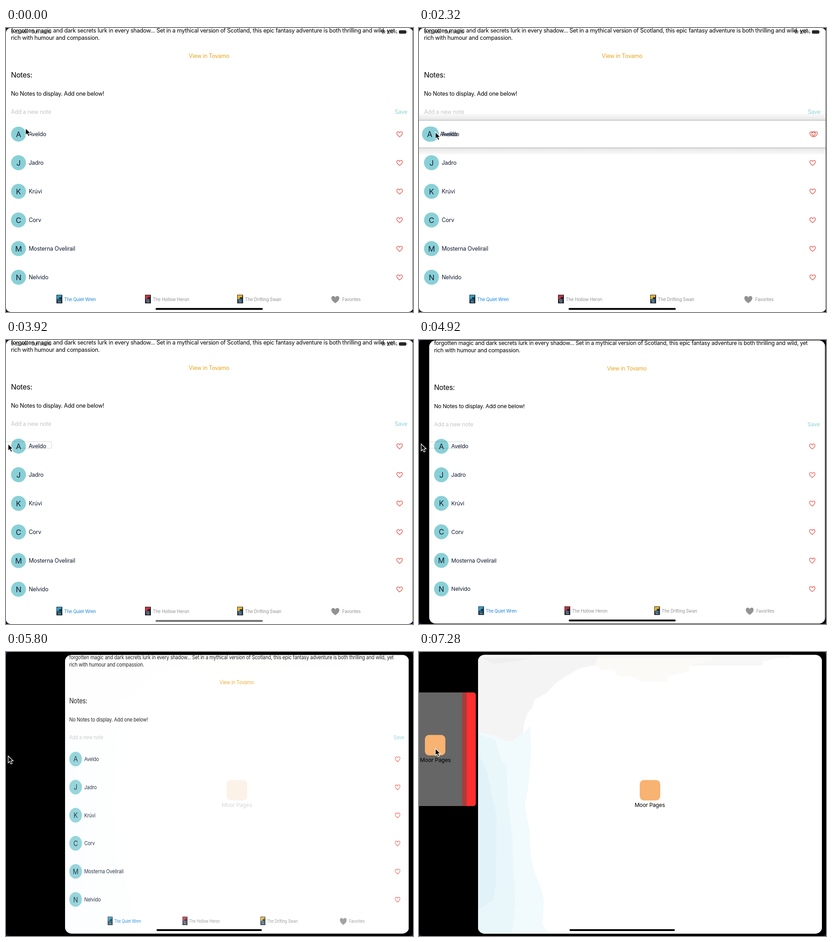
Recreate the animation shown at these times as an HTML page. Size 896 by 625 pixels, loop 8 s.

```html
<!DOCTYPE html>
<html lang="en">
<head>
<meta charset="utf-8">
<title>Dragging a row into a new window</title>
<style>
  html, body { margin: 0; width: 100%; height: 100%; overflow: hidden; background: #1c1236; }
  svg { display: block; width: 896px; height: 625px; }
  text { font: 12.4px Inter, "Open Sans", sans-serif; letter-spacing: -.017em; white-space: pre; }
</style>
</head>
<body>
<svg viewBox="0 0 896 625">
  <defs>
    <clipPath id="windowClip"><rect id="clipRect"/></clipPath>
    <linearGradient id="shade" x1="0" y1="1" x2="0" y2="0">
      <stop offset="0" stop-opacity=".24"/>
      <stop offset=".22" stop-opacity=".09"/>
      <stop offset=".5" stop-opacity=".06"/>
      <stop offset="1" stop-opacity=".025"/>
    </linearGradient>
  </defs>
  <rect width="896" height="625" rx="9"/>
  <g clip-path="url(#windowClip)">
    <rect width="896" height="625" fill="#fff"/>
    <g id="app"></g>
    <g id="splash"></g>
  </g>
  <rect id="home" height="4" rx="2"/>
  <g id="preview"></g>
  <g id="panel"></g>
  <path id="cursor" d="M0 0V15.4L3.5 12.1 6 17.8 8.9 16.5 6.4 11H11.2Z" stroke="#fff" stroke-width="1.2"/>
</svg>
<script>
const $ = id => document.getElementById(id);
const set = (id, attrs) => { for (const k in attrs) $(id).setAttribute(k, attrs[k]); };
const clamp = v => Math.max(0, Math.min(1, v));
const lerp = (a, b, p) => a + (b - a) * p;
const ramp = (t, from, to) => clamp((t - from) / (to - from));
const spring = (ms, rate) => {
  const x = Math.max(0, ms) / 1000 * rate;
  return 1 - (1 + x) * Math.exp(-x);
};

const LOOP = 8000, STEP = 40, ROW_Y = 233.5, ROW_GAP = 63;
const INK = '#101a30', RED = '#e4463c', TEAL = '#89d0d6', ORANGE = '#f8b271';

const label = (x, y, str, fill = '#000', size = 12.4, anchor = 'start', weight = 400) =>
  `<text x="${x}" y="${y}" fill="${fill}" text-anchor="${anchor}" style="font-size:${size}px;font-weight:${weight}">${str}</text>`;
const box = (x, y, w, h, fill, extra = '') =>
  `<rect x="${x}" y="${y}" width="${w}" height="${h}" fill="${fill}" ${extra}/>`;
const shape = (d, fill, extra = '') => `<path d="${d}" fill="${fill}" ${extra}/>`;
const heart = (x, y, k, paint) =>
  `<path transform="translate(${x} ${y}) scale(${k})" d="M0 5.7C-3 3.6-6.2 1-6.2-2-6.2-6.2-1.6-6.6 0-3.2 1.6-6.6 6.2-6.2 6.2-2 6.2 1 3 3.6 0 5.7Z" ${paint}/>`;

const row = (name, y) =>
  `<circle cx="27.5" cy="${y}" r="16.5" fill="${TEAL}"/>` +
  label(27.5, y + 6, name[0], INK, 16.5, 'middle') +
  label(50, y + 4.5, name, INK) +
  heart(866.5, y + .3, 1, `fill="none" stroke="${RED}" stroke-width="1.2"`);

const cover = (x, base, main, accent) =>
  box(x, 587, 13, 19, base) +
  shape(`M${x + 1} 588h11l-2 5-3-1-2 4-4 1Z`, main) +
  shape(`M${x + 2} 598l4-2 5 2-2 3H${x + 2}Z`, accent) +
  box(x + 3, 602, 7, 1.5, '#e8e8e8', 'opacity=".7"');

const tab = (x, name, color) => label(x, 600.6, name, color, 9.8);

const statusBar =
  `<g id="status" opacity=".85">` +
  label(11, 12, '9:52 AM', '#000', 9.3, 'start', 500) +
  label(56, 12, 'Sun Jul 10', '#000', 9.3, 'start', 500) +
  label(862, 12, '100%', '#000', 9.3, 'end', 500) +
  [440, 447, 454].map(x => `<circle cx="${x}" cy="9" r="1.3" fill="#777"/>`).join('') +
  `<path d="M825 7.5q5-4 10 0M827 9.5q3-2.4 6 0" fill="none" stroke="#000" stroke-width="1.4"/><circle cx="830" cy="11.6" r="1.2"/>` +
  box(865, 5, 16, 7.5, '#000', 'rx="2"') + box(881.8, 7.2, 1.2, 3, '#555') + `</g>`;

const people = ['Aveldo', 'Jadro', 'Krúvi', 'Corv', 'Mosterna Ovelirail', 'Nelvido'];

$('app').innerHTML =
  label(11, 10, 'forgotten magic and dark secrets lurk in every shadow... Set in a mythical version of Scotland, this epic fantasy adventure is both thrilling and wild, yet') +
  label(11, 26.3, 'rich with humour and compassion.') +
  statusBar +
  label(447, 66, 'View in Tovamo', '#e9a31c', 12.4, 'middle') +
  label(11, 109, 'Notes:', '#000', 15.8) +
  label(11, 149.2, 'No Notes to display. Add one below!') +
  label(11, 189.2, 'Add a new note', '#c5c5c7') +
  label(883.5, 189.2, 'Save', '#8fd2d7', 12.4, 'end') +
  people.map((name, i) => row(name, ROW_Y + i * ROW_GAP)).join('') +
  cover(111, '#17303f', '#3a9cc0', '#26627f') + tab(128, 'The Quiet Wren', '#1a86dc') +
  cover(306, '#20202a', '#c8323c', '#4d6f86') + tab(323, 'The Hollow Heron', '#929295') +
  cover(509, '#262d36', '#ecb720', '#3b78a8') + tab(526, 'The Drifting Swan', '#929295') +
  heart(725, 597.6, 1.42, 'fill="#929292"') + tab(740, 'Favorites', '#929295') +
  box(895, 0, 1, 625, '#555');

const appIcon = (x, y, size) => box(x, y, size, size, ORANGE, 'rx="9"');

$('splash').innerHTML =
  box(130, 6, 758, 615, '#fff') +
  shape('M250 6H820L815 13H790L757 21V30H595L560 30H250Z', '#f7f7f7') +
  shape('M388 13H645V18L595 30V42L550 53 545 65H492L470 55 437 52 430 38 400 40 388 25Z', '#fcfaf7') +
  shape('M130 6H395L388 28 355 36 325 52 302 68 281 90 254 105 250 122 238 136 231 160 228 192 195 198 165 184 130 178Z', '#f4f4f4') +
  shape('M140 13H250L225 18 165 26Z', '#eeeeee') +
  shape('M130 175L165 185 200 199 230 180 245 162 247 220 240 300 233 340 243 390 246 450 256 490 266 512 275 545 272 600 285 621H130Z', '#f1fafc') +
  shape('M130 180L168 194 182 240 193 250 195 330 205 400 208 480 212 560 204 621H130Z', '#eaf7fa') +
  shape('M130 225L150 260 160 312 171 360 170 505 165 545 130 568Z', '#e1f3f9') +
  appIcon(486, 281.7, 45) + label(508, 341, 'Moor Pages', '#000', 12.1, 'middle');

$('preview').innerHTML =
  `<g id="lifted">` + row(people[0], ROW_Y) + `</g>` +
  `<g id="shadow">` + box(-10, 189.5, 916, 15, 'url(#shade)') +
  `<rect x="-10" y="-277.5" width="916" height="15" fill="url(#shade)" transform="scale(1 -1)"/></g>` +
  box(0, 204.5, 896, 58, 'none', 'id="outline" rx="14" stroke="#000" stroke-width="9"');

$('panel').innerHTML =
  `<g id="panelBack">` + ['panelRed', 'panelGray', 'panelBand'].map((id, i) =>
    `<rect id="${id}" fill="${['#ff302f', '#666', '#a83c3c'][i]}"/>`).join('') + `</g>` +
  `<g id="panelIcon">` + appIcon(13, 182.5, 45) + `</g>` +
  `<g id="panelLabel">` + label(36, 242, 'Moor Pages', '#000', 12.3, 'middle') + `</g>`;

const cursorPath = [
  [0, 43, 220.5], [1160, 43, 220.5], [1760, 39, 226], [2040, 39, 226], [2320, 36, 229], [2840, 32, 229],
  [3200, 12, 229], [3680, 6, 229], [3880, 6, 229], [3920, 4.7, 228.7], [6480, 4.7, 228.7]
];

function cursorAt(t) {
  if (t >= 6520) return [36, 212.3];
  const i = Math.max(1, cursorPath.findIndex(k => k[0] >= t));
  const [a, b] = [cursorPath[i - 1], cursorPath[i]];
  const p = ramp(t, a[0], b[0]);
  return [lerp(a[1], b[1], p), lerp(a[2], b[2], p)];
}

function drawWindow(t) {
  const s = spring(t - 4880, 18.7);
  const x = 130 * s, y = 6.5 * s;
  const w = lerp(896, 887, s) - x, h = lerp(625, 619.7, s) - y;
  set('clipRect', { x, y, width: w, height: h, rx: s > 0 ? 14 : 10 });
  set('app', { transform: `translate(${x} ${y}) scale(${w / 896} ${h / 625})` });
  set('status', { display: t < 4920 ? 'inline' : 'none' });
  set('splash', { opacity: ramp(t, 5720, 6240) });

  const gray = Math.round(110 * (ramp(t, 2840, 3120) - ramp(t, 4320, 4480)));
  const half = lerp(118, 116, s);
  set('home', { x: 447.3 - half, y: lerp(616.3, 610, s), width: 2 * half, fill: `rgb(${gray},${gray},${gray})` });
}

function drawPreview(t, cursorX) {
  const lift = ramp(t, 440, 640), s = spring(t - 2840, 18);
  const drift = t > 3200 ? Math.min(0, cursorX - 12) * 12 / 7 : 0;
  const k = lerp(1 + .01 * lift, .25, s);
  set('preview', {
    display: t >= 480 && t < 6520 ? 'inline' : 'none',
    transform: `translate(${lerp(448, 1, s) + drift} ${lerp(ROW_Y, 231, s)}) scale(${k}) translate(-448 ${-ROW_Y})`
  });
  set('lifted', { opacity: lerp(1, .35, s) });
  set('shadow', { opacity: lift * (1 - s) });
  set('outline', { 'stroke-opacity': .08 * s });
}

function drawPanel(t) {
  const s = spring(t - 6480, 13);
  const height = lerp(12, 250, s), y = 214 - height / 2, right = lerp(130.5, 125, s);
  set('panel', { display: t >= 6520 ? 'inline' : 'none' });
  set('panelBack', { opacity: lerp(.2, 1, s) });
  set('panelRed', { x: -10, y, width: right + 10, height, rx: 5 });
  set('panelGray', { x: 0, y, width: right - 30, height });
  set('panelBand', { x: right - 30, y, width: 10, height });
  set('panelIcon', { opacity: lerp(.38, 1, s) });
  set('panelLabel', { opacity: s * s });
}

function render(now) {
  const t = Math.floor(now % LOOP / STEP) * STEP;
  const [x, y] = cursorAt(t);
  drawWindow(t);
  drawPreview(t, x);
  drawPanel(t);
  set('cursor', { transform: `translate(${x} ${y})` });
}

const start = performance.now();
function tick() {
  render(performance.now() - start);
  requestAnimationFrame(tick);
}
tick();
</script>
</body>
</html>
```
